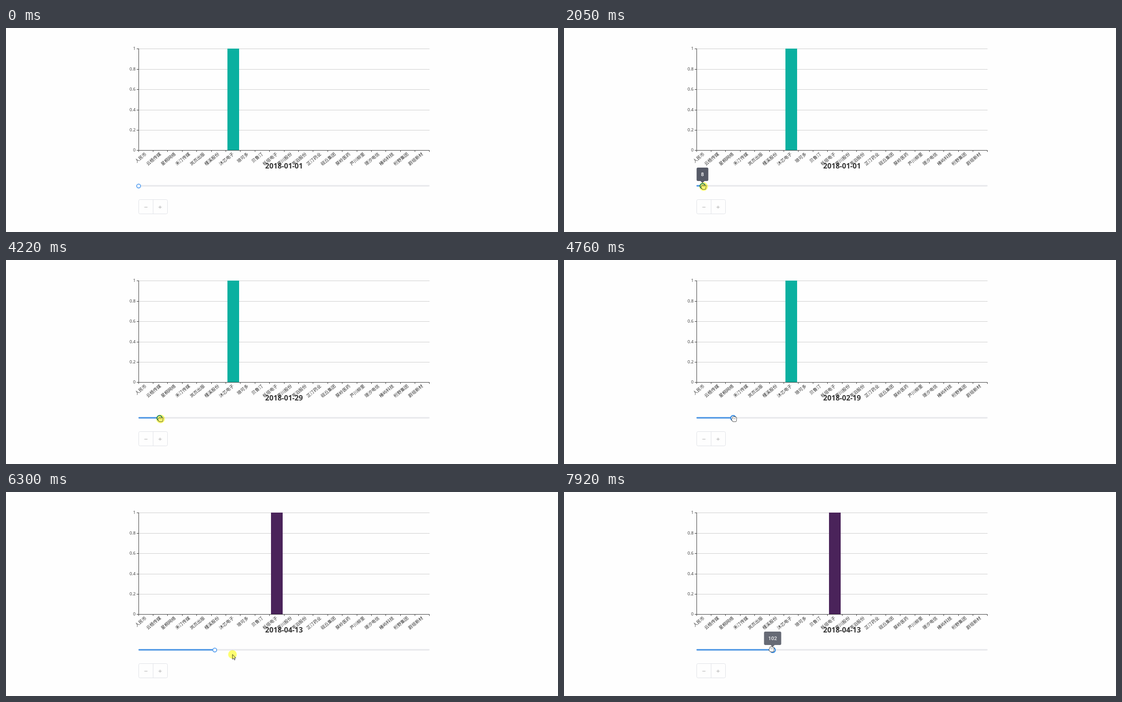
Animation of 1229 by 456 pixels, one loop 8 s. Source, as an HTML page with a canvas:

```html
<!DOCTYPE html>
<html lang="zh-CN">
<head>
<meta charset="utf-8">
<title>Timeline chart</title>
<style>
  html, body { margin: 0; width: 100%; height: 100%; overflow: hidden; background: #fefefe; }
  canvas { display: block; }
</style>
</head>
<body>
<canvas id="stage" width="1229" height="456"></canvas>
<script>
const ctx = document.getElementById('stage').getContext('2d');
const LOOP = 8000, LEFT = 295, RIGHT = 943, TOP = 46, BASE = 273, TRACK_Y = 353, MAX_DAY = 390;
const SPAN = RIGHT - LEFT;
const labels = ['人民币', '云梧传媒', '星桐网络', '禾汀传媒', '岚页出版', '槿溪股份', '沐芯电子',
  '琅可多', '贝鲁汀', '栎垣电子', '霁川股份', '苇泊股份', '芷汀药业', '砚丘集团', '葵岭医药',
  '芦川柳里', '璟汐电信', '椿屿科技', '桁野集团', '蔚垣新材'];
const step = SPAN / labels.length;

// Each drag moves the knob on by some days; the chart follows on release
const drags = [
  { tip: 1290, press: 1580, release: 3130, days: 28 },
  { tip: 4300, press: 4220, release: 4640, days: 21 },
  { tip: 5280, press: 5200, release: 5580, days: 53 }
];
const ENTERED = 810, GRIPPED = 1240, LET_GO = 5430, RETURN = 7000, BACK = 7400;
const select = { press: 6150, release: 6520 };

const ramp = (t, from, to) => Math.min(1, Math.max(0, (t - from) / (to - from)));
const mix = (a, b, k) => a + (b - a) * k;
const fadeInOut = (t, from, to) => ramp(t, from, from + 130) * (1 - ramp(t, to, to + 120));
const isHeld = ({ press, release }, t) => t >= press && t < release;
const sum = (list, fn) => list.reduce((total, item) => total + fn(item), 0);

const dayAt = t => Math.round(sum(drags, d => d.days * ramp(t, d.press + 80, d.release - 150)));
const chartDayAt = t => sum(drags, d => t < d.release ? 0 : d.days);
const knobAt = day => LEFT + SPAN * day / MAX_DAY;
const tipOpacity = t => sum(drags, d => fadeInOut(t, d.tip, d.release)) + .9 * ramp(t, 7250, 7450);

function cursorAt(t, knobX) {
  if (t < GRIPPED) {
    const enter = ramp(t, 0, ENTERED), approach = ramp(t, ENTERED, GRIPPED);
    const arc = mix(475, 389, enter) - 388 * enter * (1 - enter);
    return [mix(mix(1010, 358, enter), 298, approach), mix(arc, 351, approach)];
  }
  if (t < LET_GO) return [knobX + 2.5, mix(351, 355.3, ramp(t, 1430, 2200))];
  const back = ramp(t, RETURN, BACK);
  const x = 470 + 64 * ramp(t, 6130, 6450) - 52 * ramp(t, 6690, 6840) - 20 * back;
  return [x, 363 - 12 * back];
}

function line(x1, y1, x2, y2, color, width = 1) {
  ctx.strokeStyle = color;
  ctx.lineWidth = width;
  ctx.beginPath();
  ctx.moveTo(x1, y1);
  ctx.lineTo(x2, y2);
  ctx.stroke();
}

function text(str, x, y, font, color, align) {
  ctx.font = font;
  ctx.fillStyle = color;
  ctx.textAlign = align;
  ctx.textBaseline = 'middle';
  ctx.fillText(str, x, y);
}

function drawBar(index, height, color) {
  const left = Math.round(LEFT + step * (index + .1));
  const h = (BASE - TOP) * height;
  ctx.fillStyle = color;
  ctx.fillRect(left, BASE - h, Math.round(step * .8), h);
}

function drawChart(t) {
  for (let i = 0; i <= 5; i++) {
    const y = Math.ceil(mix(BASE, TOP, i / 5)) + .5;
    if (i) line(LEFT, y, RIGHT, y, '#ccc');
    line(LEFT - 4, y, LEFT, y, '#333');
    text(String(i / 5), 288.5, y - .3, '9.6px "Open Sans", sans-serif', '#333', 'right');
  }
  const grown = 1 - (1 - ramp(t, 5560, 5860)) ** 3;
  drawBar(6, 1 - grown, '#0ab0a0');
  drawBar(9, grown, '#4a235a');
  line(LEFT + .5, TOP, LEFT + .5, BASE + 1, '#333');
  line(LEFT, BASE + .5, RIGHT, BASE + .5, '#333');
  for (let i = 0; i <= labels.length; i++) {
    const x = Math.min(RIGHT - 1, Math.floor(LEFT + i * step)) + .5;
    line(x, BASE, x, BASE + 4, '#333');
  }
  labels.forEach((label, i) => {
    ctx.save();
    ctx.translate(LEFT + step * (i + .5), BASE + 7);
    ctx.rotate(-40 * Math.PI / 180);
    text(label, 0, 0, '9.8px "Noto Sans CJK SC", "Noto Sans CJK", sans-serif', '#333', 'right');
    ctx.restore();
  });
  const date = new Date(Date.UTC(2018, 0, 1 + chartDayAt(t))).toISOString().slice(0, 10);
  text(date, 619, 309.7, 'bold 16.1px "Open Sans", sans-serif', '#333', 'center');
}

function drawSlider(x, hovered) {
  ctx.lineCap = 'round';
  line(LEFT + 1.5, TRACK_Y - .3, RIGHT - 1.5, TRACK_Y - .3, '#e9eaed', 3.4);
  if (x > LEFT + 3) line(LEFT + 1.5, TRACK_Y - .3, x, TRACK_Y - .3, '#559be6', 3.4);
  ctx.lineCap = 'butt';
  ctx.beginPath();
  ctx.arc(x + .3, TRACK_Y + .2, hovered ? 5.6 : 4.3, 0, 7);
  ctx.fillStyle = '#fff';
  ctx.fill();
  ctx.strokeStyle = hovered ? '#2f87e0' : '#529df0';
  ctx.lineWidth = hovered ? 2.3 : 1.8;
  ctx.stroke();
}

function drawButtons() {
  ctx.strokeStyle = '#dfe1e6';
  ctx.lineWidth = 1;
  ctx.beginPath();
  ctx.roundRect(295.5, 383.5, 64, 32, 3);
  ctx.stroke();
  line(327.5, 384, 327.5, 415, '#dfe1e6');
  line(308, 400.5, 315, 400.5, '#aaa');
  line(339.5, 400.5, 346.5, 400.5, '#aaa');
  line(343, 397, 343, 404, '#aaa');
}

function drawTooltip(x, day, opacity) {
  const width = 20 + 6.1 * String(day).length;
  ctx.save();
  ctx.globalAlpha = opacity;
  ctx.fillStyle = '#565a67';
  ctx.beginPath();
  ctx.roundRect(x - width / 2, 312, width, 30, 3);
  ctx.moveTo(x - 4.5, 342);
  ctx.lineTo(x + 4.5, 342);
  ctx.lineTo(x, 346.5);
  ctx.fill();
  text(String(day), x, 327.5, '500 11.4px Roboto, sans-serif', '#fff', 'center');
  ctx.restore();
}

function drawArrow() {
  ctx.beginPath();
  ctx.moveTo(0, 0);
  ctx.lineTo(0, 11);
  ctx.lineTo(2.6, 8.7);
  ctx.lineTo(4.3, 12.6);
  ctx.lineTo(6, 11.8);
  ctx.lineTo(4.3, 8.1);
  ctx.lineTo(7.6, 8.1);
  ctx.closePath();
  ctx.fill();
  ctx.stroke();
}

// Four rounded fingers and a thumb over a palm; a closed hand has short fingers
function drawHand(closed) {
  const hand = new Path2D();
  for (let i = 0; i < 4; i++) {
    const top = closed ? -3 : -5.5 + Math.abs(i - 1.3);
    hand.roundRect(-3.8 + i * 2.2, top, 2.2, 5, 1.1);
  }
  hand.roundRect(-5.2, -.3, 2.4, 4, 1.1);
  hand.roundRect(-3.8, -1, 8.6, 7, [0, 0, 3, 3]);
  ctx.stroke(hand);
  ctx.fill(hand);
  for (let x = -1.6; x < 3; x += 2.2) line(x, -2.5, x, .5, '#555', .6);
}

function drawCursor(x, y, isHand, pressed) {
  ctx.save();
  ctx.translate(x, y);
  ctx.fillStyle = '#fff';
  ctx.strokeStyle = '#222';
  ctx.lineWidth = isHand ? 1.5 : .9;
  ctx.lineJoin = 'round';
  if (isHand) drawHand(pressed);
  else drawArrow();
  if (pressed) {
    ctx.globalCompositeOperation = 'multiply';
    ctx.fillStyle = '#ffff70';
    ctx.beginPath();
    ctx.arc(0, 0, 9.6, 0, 7);
    ctx.fill();
  }
  ctx.restore();
}

function draw(now) {
  const t = now % LOOP;
  const day = dayAt(t), knobX = knobAt(day);
  const pressed = [...drags, select].some(hold => isHeld(hold, t));
  const onKnob = t >= GRIPPED && t < LET_GO || t >= BACK - 100;
  ctx.fillStyle = '#fefefe';
  ctx.fillRect(0, 0, 1229, 456);
  drawChart(t);
  drawSlider(knobX, onKnob);
  drawButtons();
  drawTooltip(knobX, day, tipOpacity(t));
  drawCursor(...cursorAt(t, knobX), onKnob, pressed);
  requestAnimationFrame(draw);
}
requestAnimationFrame(draw);
</script>
</body>
</html>
```
